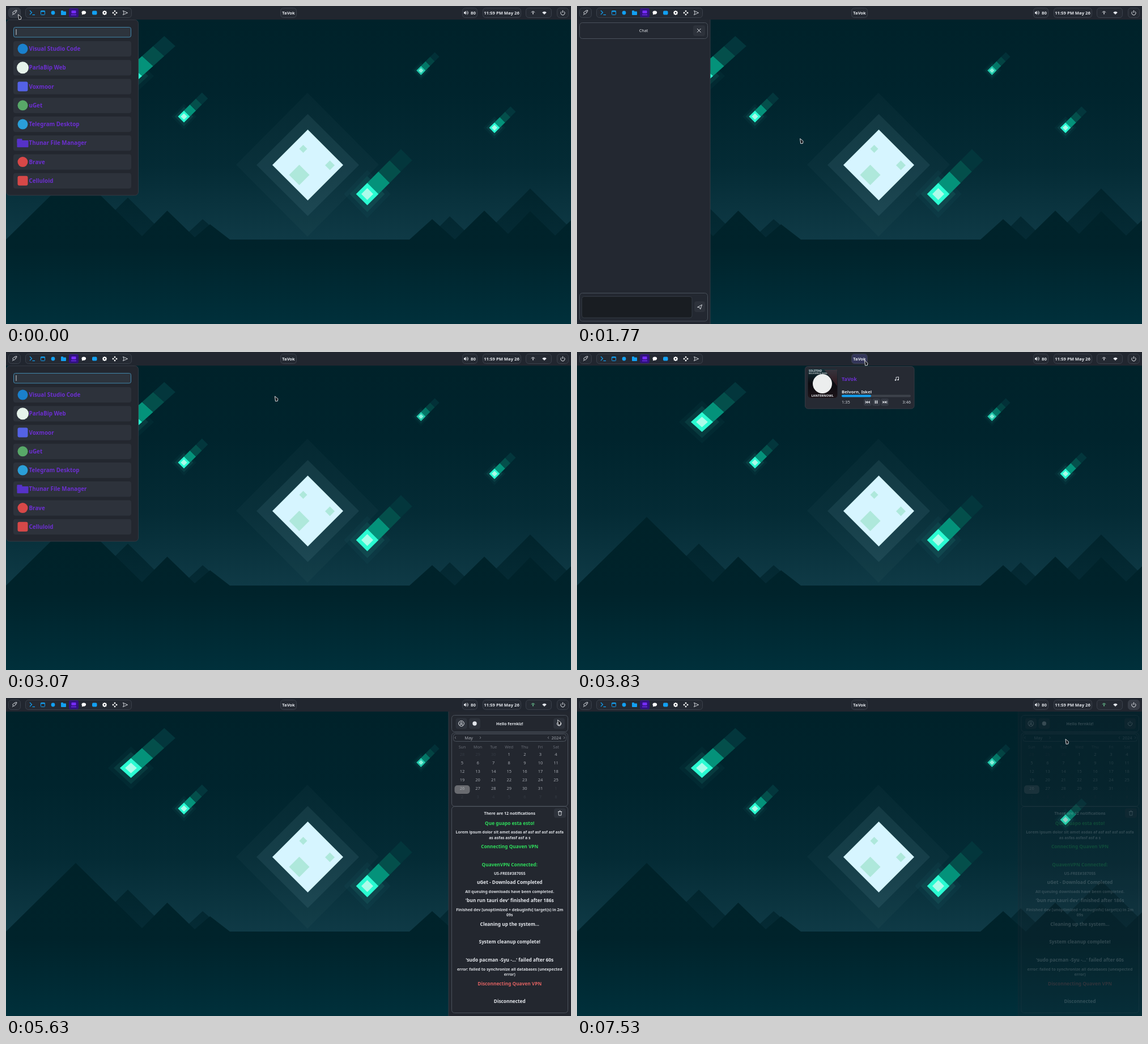
An HTML page with a canvas that plays this animation: 997x561 px, repeating every 7.56 s.

```html
<!DOCTYPE html>
<html lang="en">
<head>
<meta charset="utf-8">
<title>Desktop shell tour</title>
<style>
  html, body { margin: 0; width: 100%; height: 100%; overflow: hidden; background: #00232c; }
  canvas { display: block; }
</style>
</head>
<body>
<canvas id="stage" width="997" height="561"></canvas>
<script>
const ctx = document.getElementById('stage').getContext('2d');
const LOOP = 7560;
const BLUE = '#12a0f2', WHITE = '#e3e6eb', PURPLE = '#6c2fd0', GREEN = '#2fdb5c', RED = '#de6262';
const PANEL = '#23272f', EDGE = '#3b414b', BUTTON = '#2d323b';

// ---------- helpers ----------
const clamp = v => Math.max(0, Math.min(1, v));
const ramp = (t, a, b) => clamp((t - a) / (b - a));
const smooth = p => p * p * (3 - 2 * p);

const fade = (t, open, close) => ramp(t, open, open + 150) * (1 - ramp(t, close, close + 200));
const grow = alpha => 1 - (1 - alpha) ** 2;

function paint(fill, stroke, width = 1) {
  if (fill) { ctx.fillStyle = fill; ctx.fill(); }
  if (stroke) { ctx.strokeStyle = stroke; ctx.lineWidth = width; ctx.stroke(); }
}
function box(x, y, w, h, r, fill, stroke) {
  ctx.beginPath();
  ctx.roundRect(x, y, w, h, r);
  paint(fill, stroke);
}
function disc(x, y, r, fill, stroke, width) {
  ctx.beginPath();
  ctx.arc(x, y, r, 0, 7);
  paint(fill, stroke, width);
}
function poly(points, fill, stroke, width) {
  ctx.beginPath();
  points.forEach(([x, y]) => ctx.lineTo(x, y));
  ctx.closePath();
  paint(fill, stroke, width);
}
function line(points, color = WHITE, width = 1) {
  ctx.beginPath();
  points.forEach(([x, y]) => ctx.lineTo(x, y));
  paint(null, color, width);
}
function arc(x, y, r, from, to, color = WHITE, width = 1) {
  ctx.beginPath();
  ctx.arc(x, y, r, from, to);
  paint(null, color, width);
}
function diamond(x, y, a, b, fill) {
  poly([[x - a, y], [x, y - b], [x + a, y], [x, y + b]], fill);
}
function text(str, x, y, size, color = WHITE, align = 'center', weight = 700) {
  ctx.font = `${weight} ${size}px "Noto Sans", sans-serif`;
  ctx.textAlign = align;
  ctx.textBaseline = 'alphabetic';
  ctx.fillStyle = color;
  ctx.fillText(str, x, y + size * 0.36);
}
function gradient(y0, y1, ...colors) {
  const g = ctx.createLinearGradient(0, y0, 0, y1);
  colors.forEach((c, i) => g.addColorStop(i / (colors.length - 1), c));
  return g;
}
function layer(alpha, draw) {
  if (alpha <= 0.004) return;
  ctx.save();
  ctx.globalAlpha = alpha;
  draw();
  ctx.restore();
}

// ---------- wallpaper ----------
function comet(x, y, a, b = a) {
  diamond(x, y, a * 2.08, b * 2.15, 'rgba(60,200,180,.035)');
  diamond(x, y, a * 1.56, b * 1.6, 'rgba(60,200,180,.1)');
  ['#04927a', '#044f4b', '#03363c'].forEach((c, i) =>
    diamond(x + a * (i + 1), y - b * (i + 1), a, b, c));
  diamond(x, y, a, b, '#2bfbd2');
  diamond(x, y, a * .53, b * .53, '#acfbea');
}

function wallpaper() {
  ctx.fillStyle = gradient(24, 412, '#00222a', '#00242d', '#042b35', '#0f3a46');
  ctx.fillRect(0, 0, 997, 413);

  const far = gradient(322, 412, '#01242c', '#052b35');
  poly([[140, 412], [215, 338], [290, 412]], far);
  poly([[308, 412], [347, 376], [388, 412]], far);
  poly([[742, 412], [783, 371], [826, 412]], far);
  poly([[835, 412], [925, 322], [997, 393], [997, 412]], far);

  diamond(532, 280, 126, 127, 'rgba(190,235,250,.022)');
  diamond(532.5, 280.5, 90.5, 90, 'rgba(190,235,250,.075)');
  diamond(532.5, 280.5, 62.5, 62.5, '#d6f5ff');
  diamond(524.5, 252, 7, 7, '#aee8db');
  diamond(571.5, 281, 8.5, 8.5, '#aee8db');
  diamond(517.5, 298, 18, 18, '#aee8db');

  comet(220.5, 123.5, 19.6, 17.6);
  comet(314, 195, 10.6);
  layer(.75, () => comet(732.3, 113.8, 8.1));
  comet(862, 214.8, 9.4);
  comet(637.5, 331.7, 19.8);

  poly([[0, 412], [123, 291], [240, 406], [284.5, 361], [333, 408], [360, 385], [395, 412],
    [712, 412], [752, 376], [792, 412], [844, 361], [886, 402], [925, 362], [969, 405],
    [997, 378], [997, 561], [0, 561]], gradient(291, 561, '#002229', '#00232b', '#00303b'));
}

// ---------- icons ----------
function powerIcon(x, y, r = 3.6) {
  arc(x, y + .4, r, -.9, Math.PI + .9);
  line([[x, y - r - .8], [x, y]]);
}
function sendIcon(x, y, s, flat) {
  const pts = flat
    ? [[-1, -.9], [1, 0], [-1, .9], [-.6, 0]]
    : [[-1, .1], [1, -1], [.3, 1], [-.1, .2]];
  poly(pts.map(([a, b]) => [x + a * s, y + b * s]), null, WHITE, .9);
}
function folder(x, y, w, h, color) {
  box(x - w / 2, y - h / 2, w * .45, h * .5, 1, color);
  box(x - w / 2, y - h * .32, w, h * .82, 1, color);
}
function trash(x, y) {
  line([[x - 3.5, y - 2.5], [x + 3.5, y - 2.5]]);
  line([[x - 2.6, y - 2], [x - 2.2, y + 4], [x + 2.2, y + 4], [x + 2.6, y - 2]], WHITE, .9);
  line([[x - 1.2, y - 4], [x + 1.2, y - 4]]);
}

// ---------- top bar ----------
function pill(x, w, lit) {
  box(x + .5, 3.5, w, 17, 5, lit || '#252a33', EDGE);
}

function bar(t) {
  ctx.fillStyle = '#21262f';
  ctx.fillRect(0, 0, 997, 24);
  pill(4, 21, t < 260 && '#343943');
  line([[12, 13], [12, 11], [16, 8], [19, 7.5], [18.5, 10], [15, 14], [13, 14], [12, 13]], WHITE, .9);
  line([[11, 16], [13, 14]], WHITE, .9);
  disc(16.3, 10.2, .8, WHITE);

  pill(34, 187);
  line([[42, 8], [45.5, 11.5], [42, 15]], BLUE, 1.2);
  line([[46.5, 15.5], [51, 15.5]], BLUE, 1.2);
  box(61.5, 8.5, 7, 7, 1, null, BLUE);
  line([[61, 9.5], [69, 9.5]], BLUE, 1.6);
  disc(83, 12, 3.4, BLUE);
  folder(101.5, 12, 9, 8, BLUE);
  box(111, 4, 17, 16, 3, '#32127f');
  box(115.5, 8, 8, 5, 1, '#762cff');
  line([[115, 15.5], [124, 15.5]], '#762cff', 1.4);
  ctx.beginPath();
  ctx.ellipse(137.3, 11.6, 3.8, 3.1, 0, 0, 7);
  paint('#fff');
  poly([[134, 13], [134, 15.6], [137, 14.3]], '#fff');
  box(152, 8.5, 8.5, 7, 2, BLUE);
  for (let i = 0; i < 4; i++) {
    const a = i * Math.PI / 4, c = Math.cos(a) * 4, s = Math.sin(a) * 4;
    line([[174 - c, 12 - s], [174 + c, 12 + s]], '#fff', 1.7);
  }
  disc(174, 12, 2.3, null, '#fff', 1.6);
  disc(174, 12, 1.3, '#252a33');
  [[0, -3], [3, 0], [0, 3], [-3, 0]].forEach(([dx, dy]) => diamond(192 + dx, 12 + dy, 1.7, 1.7, '#fff'));
  sendIcon(210.5, 12, 4, true);

  pill(484, 28, t > 3150 && t < 4760 && '#34365a');
  text('TaVok', 498.5, 12, 7.5);

  pill(805, 26);
  poly([[808, 10.5], [809.5, 10.5], [811.5, 8.5], [811.5, 15.5], [809.5, 13.5], [808, 13.5]], WHITE);
  arc(811.5, 12, 2, -1, 1, WHITE, .9);
  arc(811.5, 12, 4, -1, 1, WHITE, .9);
  text('80', 824.5, 12, 7.8);
  pill(841, 67);
  text('11:59 PM May 26', 874.5, 12, 7.65);

  pill(917, 45);
  const net = t > 5000 ? '#72d69a' : WHITE;
  arc(930, 12.5, 3, Math.PI * 1.1, Math.PI * 1.9, net);
  disc(930, 12, 1, net);
  line([[930, 12], [930, 15]], net);
  ctx.beginPath();
  ctx.moveTo(950, 15);
  ctx.arc(950, 15, 5.2, Math.PI * 1.24, Math.PI * 1.76);
  paint(WHITE);

  const hover = (t > 5060 && t < 5450) || t > 7020;
  pill(972, 20, hover && '#363b45');
  powerIcon(982.5, 12);
}

// ---------- launcher ----------
const APPS = ['Visual Studio Code', 'ParlaBip Web', 'Voxmoor', 'uGet', 'Telegram Desktop',
  'Thunar File Manager', 'Brave', 'Celluloid'];
const APP_COLORS = ['#1a80cc', '#e6f3eb', '#5462e6', '#58a868', '#2a9fd8', '#5632c8', '#d84848', '#d64848'];

function launcher(k) {
  const pitch = 33.25 * k;
  box(.5, 24.5, 233, 309.5 * k, 6, PANEL, '#333842');
  ctx.beginPath();
  ctx.rect(0, 24, 235, 310 * k);
  ctx.clip();
  box(13.5, 37.5, 207, 17.5, 3, '#2d343d', '#4187ac');
  line([[18, 41], [18, 51]], WHITE, .9);
  APPS.forEach((name, i) => {
    const y = 42.3 + pitch * (i + 1), c = APP_COLORS[i];
    box(13, y - pitch / 2 + 3, 208, Math.max(0, pitch - 6), 4, BUTTON);
    if (i === 5) folder(29.5, y, 20, 15, c);
    else if (i === 2 || i === 7) box(20.5, y - 8.5, 18, 17, 3, c);
    else disc(29.5, y, i === 1 ? 10.5 : 9, c);
    text(name, 40.5, y, 9.85, PURPLE, 'left');
  });
}

// ---------- chat ----------
function chat() {
  ctx.fillStyle = '#232831';
  ctx.fillRect(0, 24, 235, 537);
  line([[235, 24], [235, 561]], '#343a44');
  box(4.5, 29.5, 226, 28, 5, null, '#4a515b');
  text('Chat', 117.5, 43.5, 7.2, WHITE, 'center', 500);
  box(205, 34, 21, 19, 4, BUTTON);
  line([[212, 40], [218.5, 46.5]]);
  line([[218.5, 40], [212, 46.5]]);
  box(4.5, 506.5, 226, 49.5, 5, null, '#4a515b');
  box(8.5, 512.5, 194.5, 37.5, 4, '#191d22', '#333942');
  box(207, 521, 19, 19, 4, BUTTON);
  sendIcon(216.5, 531, 4);
}

// ---------- media ----------
function media() {
  box(402.5, 25.5, 192.5, 74.5, 5, '#262a33', '#343943');
  box(407.5, 30, 52, 51, 5, gradient(30, 81, '#123038', '#0b0c11', '#1c1318'));
  poly([[436, 31], [459, 31], [459, 60]], 'rgba(150,70,80,.28)');
  disc(433, 56, 17, '#eceeee');
  text('SOLSTEAD', 409, 33, 4.6, WHITE, 'left');
  text('BELVORN & ISKEL', 409, 37.5, 3.8, '#b9c0c2', 'left');
  text('LANTERNOWL', 433, 76.5, 5.6);
  text('TaVok', 467, 47.5, 9, PURPLE, 'left');
  line([[563, 49.5], [563, 44.5], [567.5, 44], [567.5, 49]], WHITE, .9);
  disc(562, 49.5, 1.2, WHITE);
  disc(566.5, 49, 1.2, WHITE);
  text('Belvorn, Iskel', 467, 70, 7.8, WHITE, 'left');
  box(467, 75.5, 122, 4, 2, '#3d424b');
  box(467, 75.5, 52, 4, 2, BLUE);
  text('1:35', 467, 88.5, 7.4, '#c9cdd3', 'left', 400);
  text('3:46', 589, 88.5, 7.4, '#c9cdd3', 'right', 400);
  [513, 528, 543].forEach(x => box(x - 7, 82, 14, 13, 3, '#343943'));
  line([[526.5, 85.5], [526.5, 91]], WHITE, 1.6);
  line([[529.5, 85.5], [529.5, 91]], WHITE, 1.6);
  [[513, -1], [543, 1]].forEach(([x, d]) => {
    [-3.5, 0].forEach(o => poly([[x + d * o, 86], [x + d * (o + 3), 88.5], [x + d * o, 91]], WHITE));
    line([[x + d * 3.7, 86], [x + d * 3.7, 91]], WHITE, .9);
  });
}

// ---------- sidebar ----------
const NOTES = [
  [221, 'Que guapo esta esto!', GREEN],
  [236.5, 'Lorem ipsum dolor sit amet asdas af asf asf asf asf asfa'],
  [246, 'as asfas asfasf asf a s'],
  [262.5, 'Connecting Quaven VPN', GREEN],
  [294, 'QuavenVPN Connected:', GREEN],
  [309.5, 'US-FREE#387055'],
  [325.5, 'uGet - Download Completed', WHITE],
  [341.5, 'All queuing downloads have been completed.'],
  [357.5, "'bun run tauri dev' finished after 186s", WHITE],
  [373, 'Finished dev [unoptimized + debuginfo] target(s) in 2m'],
  [382.5, '09s'],
  [399, 'Cleaning up the system...', WHITE],
  [430.5, 'System cleanup complete!', WHITE],
  [462.5, "'sudo pacman -Syu -...' failed after 60s", WHITE],
  [478, 'error: failed to synchronize all databases (unexpected'],
  [487.5, 'error)'],
  [504, 'Disconnecting Quaven VPN', RED],
  [535.5, 'Disconnected', WHITE],
];

function calendar(left, shift) {
  const first = left + 24, step = (970.5 - first) / 6;
  const dim = '#858a92', faint = '#343a43';
  box(left + 5.5, 61.5 + shift, 986 - left, 129.5, 5, null, '#4a515b');
  box(left + 8.5, 63.5 + shift, 980 - left, 13, 4, null, '#4a515b');
  text('May', left + 35.5, 70 + shift, 7.4, '#a5a9b0', 'center', 400);
  text('2024', 971, 70 + shift, 7.4, '#a5a9b0', 'center', 400);
  [[left + 12, -1], [left + 56, 1], [957, -1], [985, 1]].forEach(([x, d]) =>
    line([[x - d, 68 + shift], [x + d, 70 + shift], [x - d, 72 + shift]], dim, .8));
  'Sun Mon Tue Wed Thu Fri Sat'.split(' ').forEach((d, i) =>
    text(d, first + i * step, 86.5 + shift, 7.1, '#686d76', 'center', 400));
  box(first - 13.5, 154 + shift, 27, 15, 5, '#696b70');
  for (let i = 0; i < 42; i++) {
    const n = i - 2, inside = n >= 1 && n <= 31;
    const day = n < 1 ? n + 30 : n > 31 ? n - 31 : n;
    text(day, first + i % 7 * step, 99 + Math.floor(i / 7) * 15.05 + shift, 7.5,
      n === 26 ? '#a9acb1' : inside ? '#a2a6ad' : faint, 'center', 400);
  }
}

function powerRow(left, k, alpha) {
  layer(k * alpha, () => {
    const y = 46 + 29 * k, first = left + 26, step = (970.5 - first) / 4;
    const xs = [0, 1, 2, 3, 4].map(i => first + i * step);
    xs.forEach(x => box(x - 15.5, y - 9.5, 31, 19, 4, BUTTON));
    box(xs[0] - 3.5, y - 1, 7, 5, 1, null, WHITE);
    arc(xs[0], y - 1.5, 2.3, Math.PI, 0);
    text('z', xs[1] - 2.5, y + 1, 10, WHITE, 'center', 400);
    text('z', xs[1] + 3, y - 3, 8, WHITE, 'center', 400);
    line([[xs[2] + 1, y - 4.5], [xs[2] - 4.5, y - 4.5], [xs[2] - 4.5, y + 4.5], [xs[2] + 1, y + 4.5]]);
    line([[xs[2] - 1, y], [xs[2] + 5, y]]);
    line([[xs[2] + 3, y - 2.3], [xs[2] + 5, y], [xs[2] + 3, y + 2.3]]);
    arc(xs[3], y, 4, .2, 2.8);
    arc(xs[3], y, 4, Math.PI + .2, Math.PI + 2.8);
    line([[xs[3] + 4, y - 4], [xs[3] + 4, y - 1], [xs[3] + 1, y - 1]], WHITE, .9);
    line([[xs[3] - 4, y + 4], [xs[3] - 4, y + 1], [xs[3] - 1, y + 1]], WHITE, .9);
    disc(xs[4], y, 4.3, null, WHITE);
    disc(xs[4], y, 2, WHITE);
  });
}

function sidebar(t, alpha) {
  const left = 781 - 2.6 * ramp(t, 6090, 6130);
  const k = smooth(ramp(t, 6100, 6400)) * (1 - smooth(ramp(t, 6775, 7100)));
  const shift = 28.7 * k, mid = (left + 996.5) / 2;
  ctx.fillStyle = PANEL;
  ctx.fillRect(left, 24, 997 - left, 537);
  line([[left, 24], [left, 561]], '#343a44');

  box(left + 5.5, 30.5, 986 - left, 29, 5, null, '#4a515b');
  [left + 22.5, left + 46, 976].forEach((x, i) =>
    box(x - 10, 35.5, 20, 19, 4, i === 2 && t > 5900 && t < 6960 ? '#565a62' : BUTTON));
  disc(left + 22.5, 45, 4.8, null, WHITE);
  disc(left + 22.5, 44, 1.7, null, WHITE, .9);
  arc(left + 22.5, 48.5, 2.5, Math.PI, 0);
  disc(left + 46, 45, 3.7, WHITE);
  powerIcon(976, 45);
  text('Hello fernkiz!', mid, 45, 7.2);

  powerRow(left, k, alpha);
  calendar(left, shift);

  const top = 191.5 + shift;
  box(left + 5.5, top, 986 - left, 555.5 - top, 5, null, '#4a515b');
  text('There are 12 notifications', mid, 203 + shift, 7.1);
  box(967, 194.5 + shift, 21, 17, 4, BUTTON);
  trash(977.5, 203 + shift);
  ctx.save();
  ctx.beginPath();
  ctx.rect(left, top, 997 - left, 554 - top);
  ctx.clip();
  NOTES.forEach(([y, str, color]) =>
    text(str, mid, y + shift, color ? 8.3 : 6.95, color || '#dadde2'));
  ctx.restore();
}

// ---------- pointer ----------
const PATH = [[0, 21, 14.5], [250, 21, 14.5], [660, 393, 234], [1700, 393, 234], [2000, 394, 230],
  [2750, 394, 230], [3250, 507, 14.5], [4700, 507, 14.5], [5100, 982, 10], [5350, 982, 12],
  [5600, 973, 38], [6050, 975, 45], [6500, 976.5, 46], [6770, 976.5, 46], [7080, 983, 11],
  [7370, 983, 11], [7530, 861.5, 72], [LOOP, 861.5, 72]];

function pointer(t) {
  const i = PATH.findIndex(p => p[0] > t);
  const [t0, x0, y0] = PATH[i - 1], [t1, x1, y1] = PATH[i];
  const p = smooth(ramp(t, t0, t1));
  const x = x0 + (x1 - x0) * p, y = y0 + (y1 - y0) * p;
  poly([[x + .5, y + .5], [x + 6, y + 5], [x + 5.3, y + 9], [x + 1.5, y + 9.3]], '#1a1c21', '#d9dbde', 1);
}

function frame() {
  const t = performance.now() % LOOP;
  wallpaper();
  bar(t);

  const launch = t < 1000 ? fade(t, -500, 100) : fade(t, 2400, 3110);
  layer(launch, () => launcher(grow(launch)));
  layer(fade(t, 870, 2170), chat);
  layer(fade(t, 3380, 4560), media);
  const side = fade(t, 5180, 7370);
  layer(side, () => sidebar(t, side));

  pointer(t);
  requestAnimationFrame(frame);
}
frame();
</script>
</body>
</html>
```
